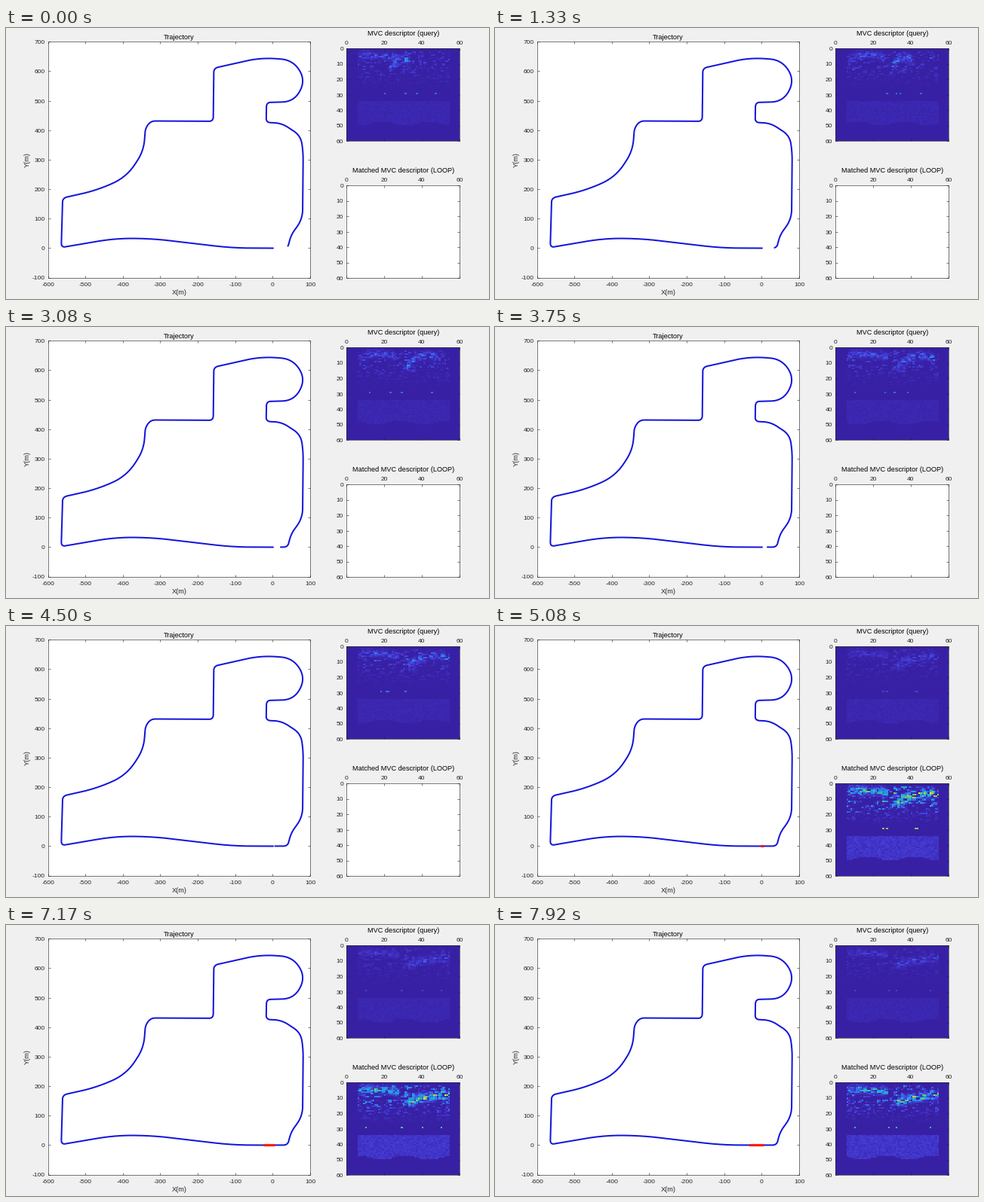
A matplotlib script that plays this animation: 640 px wide and 360 px high, repeating every 8 s.

```python
import numpy as np
import matplotlib.pyplot as plt
from matplotlib.animation import FuncAnimation
from matplotlib.colors import LinearSegmentedColormap
from matplotlib.patches import Rectangle

W, H, DPI = 640, 360, 80
PT = 72 / DPI
LOOP_MS, TICK_MS = 8000, 40
INK = "#262626"
BLUE, RED = "#1414dc", "#fa1e0a"
PAPER, FIGURE = "#ffffff", "#f0f0f0"
PARULA = LinearSegmentedColormap.from_list("parula_like", [
    (0, "#3820a4"), (0.15, "#4640dc"), (0.3, "#2e88ee"), (0.43, "#14acd6"),
    (0.55, "#30c2a8"), (0.72, "#8ccb5c"), (0.88, "#f0c038"), (1, "#f9fb15")])

plt.rcParams["font.family"] = "Liberation Sans"
fig = plt.figure(figsize=(W / DPI, H / DPI), dpi=DPI, facecolor=FIGURE)
ax = fig.add_axes([0, 0, 1, 1])
ax.axis("off")


def label(x, y, text, size=9.2, color=INK, **kw):
    ax.text(x, y, text, fontsize=size * PT, color=color, zorder=6,
            **{"ha": "center", "va": "baseline", **kw})


def segment(xs, ys):
    ax.plot(xs, ys, color=INK, lw=0.6 * PT, zorder=3, solid_capstyle="butt")


def ticks(values, start, end):
    return [(p, str(v)) for p, v in
            zip(np.linspace(start, end, len(values)), values)]


def plot_box(left, top, right, bottom, xvalues, yvalues, x_label_y):
    """Framed plot area with inward ticks on all four sides."""
    ax.add_patch(Rectangle((left, top), right - left, bottom - top,
                           fc=PAPER, ec="none", zorder=0))
    segment([left, right, right, left, left], [top, top, bottom, bottom, top])
    for x, text in ticks(xvalues, left, right):
        segment([x, x], [top, top + 3])
        segment([x, x], [bottom, bottom - 3])
        label(x, x_label_y, text, 8.4)
    for y, text in ticks(yvalues, top, bottom):
        segment([left, left + 3], [y, y])
        segment([right, right - 3], [y, y])
        label(left - 4, y + 3, text, 8.4, ha="right")


def picture(top, title):
    plot_box(451, top, 601, top + 123, range(0, 61, 20), range(0, 61, 10),
             top - 4.5)
    label(526.5, top - 17, title, color="black")
    return ax.imshow(np.zeros((60, 60)), cmap=PARULA, vmin=0, vmax=1,
                     extent=(451, 601, top + 123, top), aspect="auto",
                     interpolation="nearest", zorder=1)


plot_box(55.6, 18.2, 403, 331.5, range(-600, 101, 100),
         range(700, -101, -100), 343)
label(229.5, 14.7, "Trajectory", color="black")
label(229.5, 354.3, "X(m)")
label(28, 175, "Y(m)", rotation=90, va="center")
query = picture(27, "MVC descriptor (query)")
match = picture(209, "Matched MVC descriptor (LOOP)")
ax.set_xlim(0, W)
ax.set_ylim(H, 0)

# Street corners along the drive
CORNERS = [
    (354, 292.5), (300, 292.3), (195, 279.8), (145, 279.3), (73.2, 291.7),
    (75, 225.8), (120, 215.8), (160, 198), (182.5, 163), (184.7, 133),
    (192, 123.5), (274.6, 124), (275.3, 53.4), (338, 39.2), (380, 42.5),
    (397, 69), (382, 98), (345.2, 98.8), (344.6, 125.5), (365, 126.3),
    (390.5, 143), (393.8, 165), (393, 254), (377.5, 275), (373.4, 292.4),
    (338, 292.4)]


def drive(corners):
    """Round each corner: tightly at street crossings, widely in bends."""
    pts = np.array(corners)
    t = np.linspace(0, 1, 16)[:, None]
    out = [pts[:1]]
    for a, b, c in zip(pts, pts[1:], pts[2:]):
        len_in, len_out = np.hypot(*(b - a)), np.hypot(*(c - b))
        u, v = (b - a) / len_in, (c - b) / len_out
        sharp = u @ v < np.cos(np.radians(70))
        r = min(6 if sharp else 25, len_in / 2, len_out / 2)
        p, q = b - r * u, b + r * v
        out.append((1 - t) ** 2 * p + 2 * t * (1 - t) * b + t ** 2 * q)
    return np.vstack(out + [pts[-1:]])


route = drive(CORNERS)
travel = np.r_[0, np.cumsum(np.hypot(*np.diff(route, axis=0).T))]
track, = ax.plot([], [], color=BLUE, lw=2 * PT, zorder=4,
                 solid_capstyle="round", solid_joinstyle="round")
closed, = ax.plot([], [], color=RED, lw=3.2 * PT, zorder=5,
                  solid_capstyle="butt")

# Update moments in twelfths of a second; quicker once the loop is found
LOOP_START, LAST = 59, 95
STEPS = np.r_[np.linspace(0, LOOP_START, 23).round(),
              LOOP_START + 2:LAST + 1:2].astype(int)
TAIL = 36.4  # pixels still to drive at the start

ROWS, COLS = np.mgrid[0:60, 0:60] + 0.5
INSIDE = (COLS > 6) & (COLS < 55)


def grain(seed):
    """Noise with some short horizontal dashes."""
    n = np.random.default_rng(seed).random((60, 60))
    return np.maximum(n, 0.85 * np.roll(n, 1, axis=1)) ** 2


def arch(c0, r0, c1, r1, bulge, width=2.6):
    u = (COLS - c0) / (c1 - c0)
    mid = r0 + (r1 - r0) * u - 4 * bulge * u * (1 - u)
    return np.exp(-((ROWS - mid) / width) ** 2) * ((u >= 0) & (u <= 1))


def descriptor(step, gain, haze):
    """Two drifting arches, stray echoes and a hazy ground band."""
    rng = np.random.default_rng(step)
    noise = 0.6 * grain(3) + 0.4 * grain(1500 + step)
    hump = np.exp(-((step - 25) / 10) ** 2)
    left = arch(7, 5 + 6 * hump, 28 - 5 * hump, 6.5, 1 + 5 * hump)
    right = arch(33 - 10 * np.exp(-step / 14), 12.5,
                 min(55, 34 + 0.45 * step), 8.5, 3 + 2 * np.sin(step / 20))
    glow = np.maximum(0.7 * left, right)
    img = glow * np.clip(noise * 1.5 - 0.2, 0, 1)
    upper = INSIDE & (ROWS > 2) & (ROWS < 26)
    fade = np.exp(-((ROWS - 8) / 11) ** 2)
    img = np.maximum(img, upper * fade * np.clip(noise - 0.48, 0, 1) * 1.3)
    img[29, rng.integers(8, 54, 4)] = 0.6
    bottom = 49 + 1.5 * np.sin(COLS / 4 + step / 9)
    fog = INSIDE & (ROWS > 34) & (ROWS < bottom)
    return gain * img + fog * haze * (0.6 + 0.8 * rng.random((60, 60)))


queries = {s: descriptor(s, 0.24 if s >= LOOP_START else 0.4, 0.035)
           for s in STEPS}
matches = {s: descriptor(s, 1.2 - 0.3 * (s - LOOP_START) / 36, 0.1)
           for s in STEPS if s >= LOOP_START}


def update(i):
    now = (i + 1) * TICK_MS - 1
    step = STEPS[STEPS * 1000 / 12 <= now][-1]
    done = travel[-1] - TAIL * (1 - (step / LAST) ** 1.25)
    head = [np.interp(done, travel, route[:, k]) for k in (0, 1)]
    track.set_data(*np.vstack([route[travel < done], head]).T)
    query.set_data(queries[step])
    found = step >= LOOP_START
    match.set_visible(found)
    closed.set_visible(found)
    if found:
        match.set_data(matches[step])
        closed.set_data([355.5, head[0] - 1.5], [292.4, 292.4])
    return track, closed, query, match


anim = FuncAnimation(fig, update, frames=LOOP_MS // TICK_MS, interval=TICK_MS,
                     repeat=True, repeat_delay=0, blit=False)
plt.show()
```
